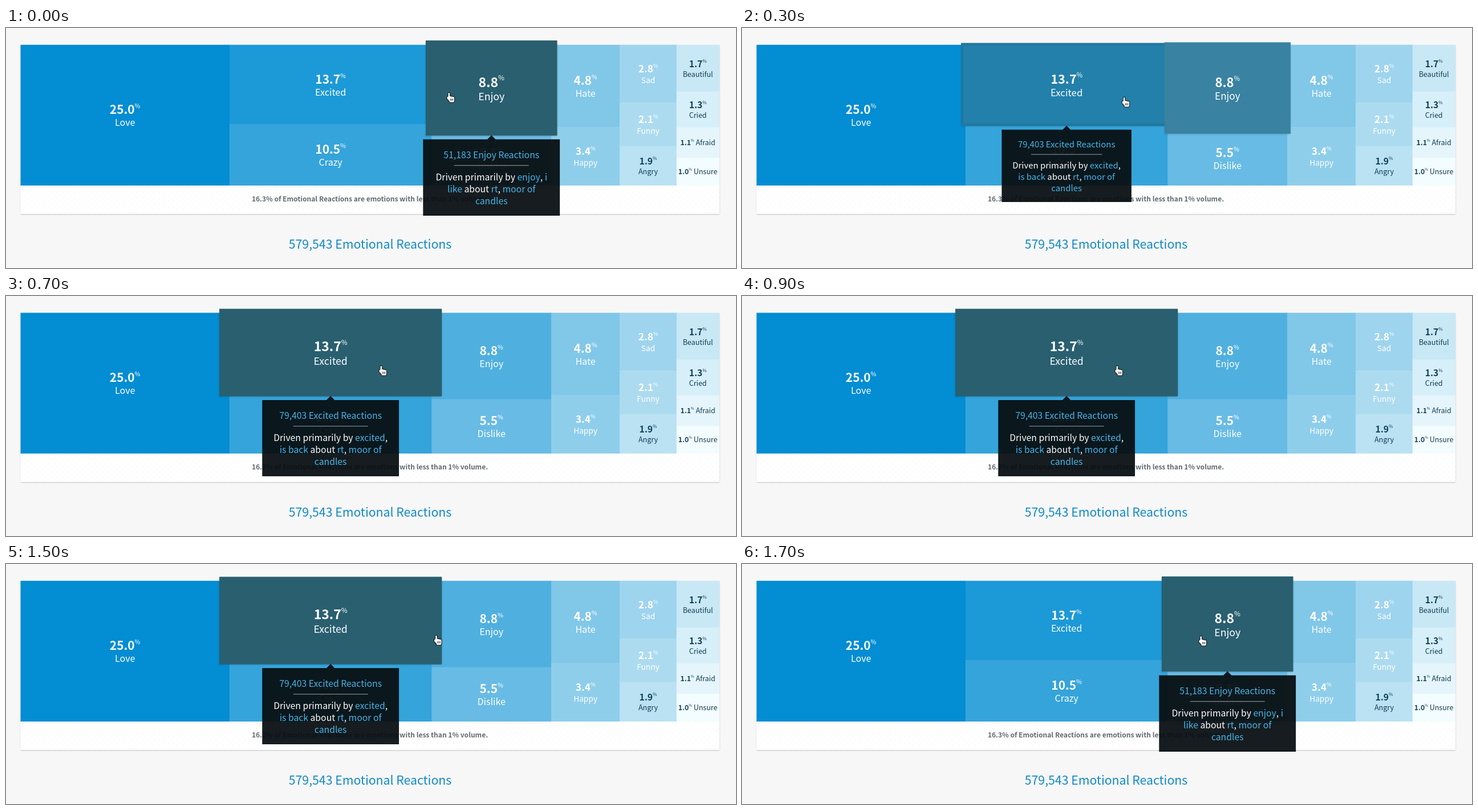
These frames come from a looping animation (1280x422 px, 1.8 s). An HTML page with a canvas:

```html
<!DOCTYPE html>
<html lang="en">
<head>
<meta charset="utf-8">
<title>Emotional Reactions</title>
<style>
  html, body { margin: 0; width: 100%; height: 100%; overflow: hidden; background: #f7f7f7; }
  canvas { display: block; }
</style>
</head>
<body>
<canvas id="stage" width="1280" height="422"></canvas>
<script>
const ctx = document.getElementById('stage').getContext('2d');
const LOOP = 1800, STEP = 100;
const MAP = { x: 25.5, y: 29.5, w: 1225, h: 247, footer: 50.5 };
const FAMILY = "'Noto Sans CJK JP', 'Noto Sans CJK SC', 'Noto Sans CJK', 'Open Sans', sans-serif";
const LINK = '#45b6e8', DARK = '#123f55', HOVER = [42, 95, 112];
const SHADES = [[3, 141, 211], [129, 199, 232], [243, 252, 254]];

const COLUMNS = ['Love 25.0', 'Excited 13.7 Crazy 10.5', 'Enjoy 8.8 Dislike 5.5', 'Hate 4.8 Happy 3.4',
  'Sad 2.8 Funny 2.1 Angry 1.9', 'Beautiful 1.7 Cried 1.3 Afraid 1.1 Unsure 1.0'];
const TIPS = {
  Excited: ['*79,403 Excited Reactions', 'Driven primarily by *excited*,', '*is back* about *rt*, *moor of', '*candles'],
  Enjoy: ['*51,183 Enjoy Reactions', 'Driven primarily by *enjoy*, *i', '*like* about *rt*, *moor of', '*candles']
};

const clamp = v => Math.min(1, Math.max(0, v));
const blend = (a, b, p) => a.map((c, i) => c + (b[i] - c) * p);
const rgb = c => `rgb(${c.map(Math.round)})`;
const sum = list => list.reduce((a, b) => a + +b, 0);
const regular = size => `${size * 0.895}px ${FAMILY}`;
const bold = size => `600 ${size * 0.87}px ${FAMILY}`;
const shade = i => i < 5 ? blend(SHADES[0], SHADES[1], i / 5) : blend(SHADES[1], SHADES[2], (i - 5) / 8);
const numberSize = pct => pct > 4 ? 24 : pct > 2 ? 20 : pct > 1.2 ? 18 : 14;

// Treemap: column widths and tile heights are proportional to their percentages.
function layout() {
  const numbers = column => column.match(/[\d.]+/g);
  const total = sum(COLUMNS.flatMap(numbers)), tiles = [];
  let x = MAP.x;
  for (const column of COLUMNS) {
    const share = sum(numbers(column)), w = MAP.w * share / total;
    let y = MAP.y;
    for (const [, name, pct] of column.matchAll(/(\w+) ([\d.]+)/g)) {
      const h = MAP.h * pct / share;
      tiles.push({ name, pct, w, h, cx: x + w / 2, cy: y + h / 2, rgb: shade(tiles.length),
        size: numberSize(pct), ink: pct < 2 ? DARK : '#fff' });
      y += h;
    }
    x += w;
  }
  return tiles;
}
const tiles = layout();
const [excited, enjoy] = Object.keys(TIPS).map(name => tiles.find(t => t.name === name));

// Draws runs of [string, font, colour, rise] as one line centred on (cx, cy).
function line(runs, cx, cy, size) {
  const widths = runs.map(([str, font]) => (ctx.font = font, ctx.measureText(str).width));
  let x = cx - sum(widths) / 2;
  runs.forEach(([str, font, colour, rise = 0], i) => {
    ctx.font = font;
    ctx.fillStyle = colour;
    ctx.fillText(str, x, cy + size * 0.33 - rise);
    x += widths[i];
  });
}

// Runs draw() in the tile's own space, enlarged by up to a tenth.
function inTile(t, p, draw) {
  ctx.save();
  ctx.translate(t.cx, t.cy);
  ctx.scale(1 + p / 10, 1 + p / 10);
  draw(t);
  ctx.restore();
}

function drawTile(t, p = 0, growing = false) {
  inTile(t, p, ({ w, h, size, ink }) => {
    ctx.shadowColor = `rgba(0,0,0,${0.35 * p})`;
    ctx.shadowBlur = 3;
    ctx.shadowOffsetY = 1;
    ctx.fillStyle = rgb(blend(t.rgb, HOVER, p));
    // Unscaled tiles overlap by half a pixel to hide seams.
    const overlap = p ? 0 : 0.5;
    ctx.fillRect(-w / 2, -h / 2, w + overlap, h + overlap);
    ctx.shadowColor = 'transparent';
    if (growing && p < 1) {
      ctx.strokeStyle = 'rgba(35,115,155,.7)';
      ctx.lineWidth = 4;
      ctx.strokeRect(2 - w / 2, 2 - h / 2, w - 4, h - 4);
    }
    const number = [[t.pct, bold(size), ink], ['%', regular(size / 2), ink, size * 0.42]];
    if (size === 14) {
      line([...number, [' ' + t.name, regular(size), ink]], 0, 0, size);
    } else {
      const labelSize = size * 2 / 3 + 2;
      line(number, 0, -0.3 * size - 2.5, size);
      line([[t.name, regular(labelSize), ink]], 0, size / 2 + 1.5, labelSize);
    }
  });
}

function drawTip(t, p) {
  inTile(t, p, () => {
    ctx.translate(0, t.h / 2 + 6);
    ctx.fillStyle = 'rgba(8,14,18,.94)';
    ctx.beginPath();
    ctx.rect(-109, 0, 218, 122);
    ctx.moveTo(-6.5, 0);
    ctx.lineTo(0, -6.5);
    ctx.lineTo(6.5, 0);
    ctx.fill();
    ctx.fillStyle = 'rgba(255,255,255,.55)';
    ctx.fillRect(-59.5, 41.3, 119, 1);
    TIPS[t.name].forEach((str, i) => {
      const runs = str.split('*').map((s, k) => [s, regular(16), k % 2 ? LINK : '#fff']);
      line(runs, 0, i ? 41.6 + 19 * i : 24.6, 16);
    });
  });
}

function drawPanel() {
  const { x, y, w, h, footer } = MAP;
  ctx.save();
  ctx.shadowColor = 'rgba(0,0,0,.22)';
  ctx.shadowBlur = 2;
  ctx.shadowOffsetY = 1;
  ctx.fillStyle = '#fff';
  ctx.fillRect(x, y, w + 0.5, h + footer);
  ctx.restore();
  ctx.fillStyle = '#ebebeb';
  for (let row = 0; row < 10; row++)
    for (let dot = 29 + row % 2 * 5; dot < 1250; dot += 10) ctx.fillRect(dot, 279 + row * 5, 1, 1);
  line([['16.3% of Emotional Reactions are emotions with less than 1% volume.', bold(13.85), '#616b72']],
    638, 300.5, 13.85);
  line([['579,543 Emotional Reactions', regular(23.75), '#0f88c9']], 638.5, 380.5, 23.75);
}

// Hand: four fingers over a palm, outlined by stroking the union first.
const hand = new Path2D();
for (let i = 0; i < 4; i++) hand.roundRect(-4 + 2.6 * i, i ? -2.8 + 0.6 * i : -8, 2.6, 9, 1.3);
hand.roundRect(-4, 0, 10.4, 6, 2);
hand.roundRect(-2, 3, 7.5, 5.5, 0.5);
hand.roundRect(-6, -1.5, 3, 5, 1.5);

function drawPointer(time) {
  const back = clamp((time - 1300) / 330);
  const away = (1 - clamp(time / 400)) ** 1.64, home = back * back * (3 - 2 * back);
  ctx.save();
  ctx.translate(660.5 + 119 * away + 147 * home, 131 - 9 * away + 4 * home);
  ctx.strokeStyle = '#111';
  ctx.lineWidth = 2;
  ctx.stroke(hand);
  ctx.fillStyle = '#fff';
  ctx.fill(hand);
  ctx.fillStyle = '#111';
  for (let i = 0; i < 3; i++) ctx.fillRect(-0.6 + 2.1 * i, 2, 0.8, 4);
  ctx.restore();
}

function frame(now) {
  const time = Math.floor(now % LOOP / STEP) * STEP;
  const p = clamp((time - 200) / 200) - clamp((time - 1500) / 200);
  const onExcited = time >= 300 && time < 1600;
  const [active, leaving] = onExcited ? [excited, enjoy] : [enjoy, excited];
  const grown = (onExcited ? p : 1 - p) ** 1.2;

  ctx.fillStyle = '#f7f7f7';
  ctx.fillRect(0, 0, 1280, 422);
  drawPanel();
  tiles.forEach(t => drawTile(t));
  drawTile(active, grown, true);
  if (grown < 1) drawTile(leaving, 1 - grown);
  drawTip(active, grown);
  drawPointer(time);
  requestAnimationFrame(frame);
}
requestAnimationFrame(frame);
</script>
</body>
</html>
```
